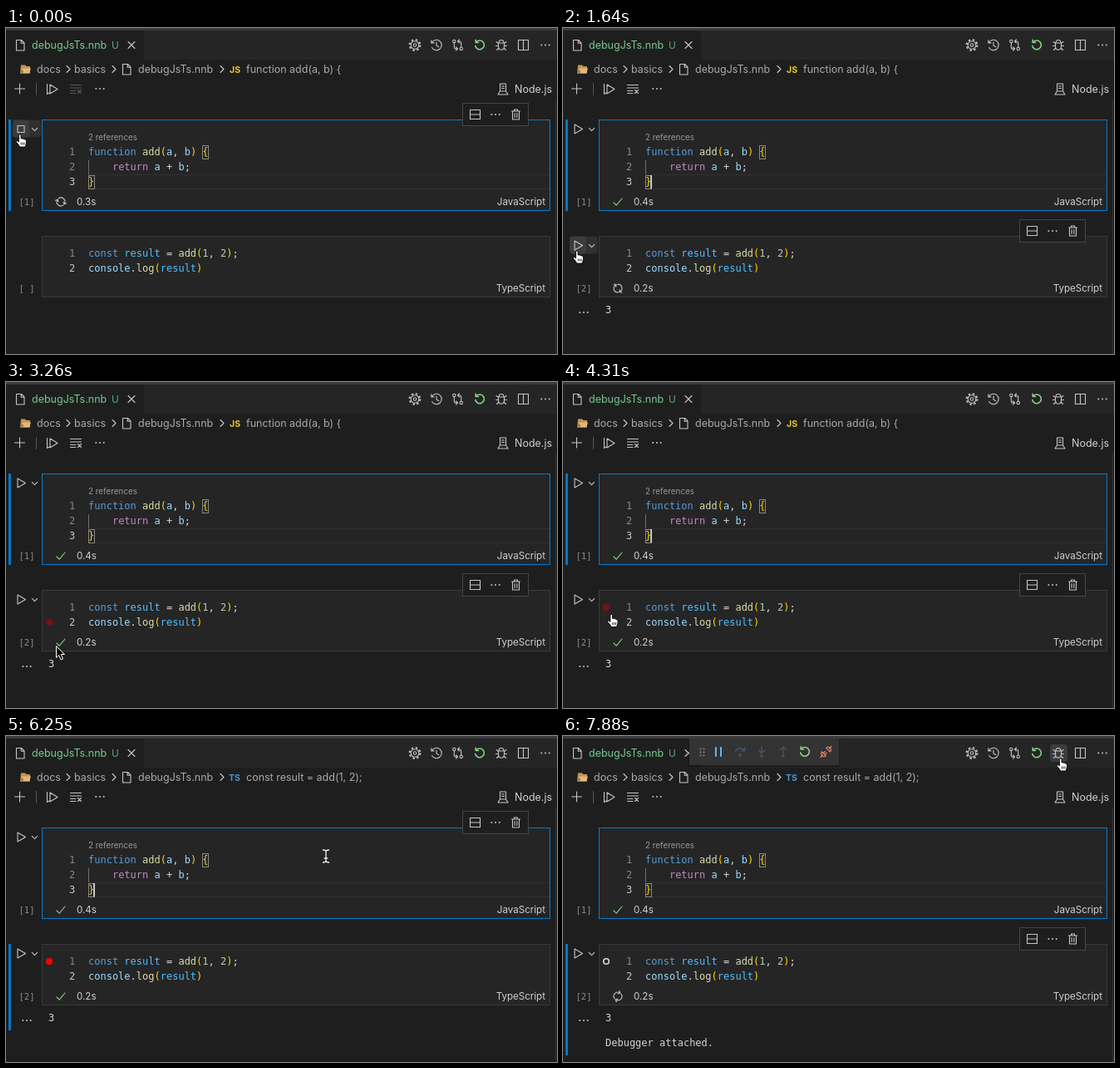
Animation, 663 px wide and 392 px high, one loop 8 s. Source, as an HTML page:

```html
<!DOCTYPE html>
<html lang="en">
<head>
<meta charset="utf-8">
<title>Notebook debugging</title>
<style>
  html, body { margin: 0; width: 100%; height: 100%; overflow: hidden; background: #1e1e1e; }
  svg { display: block; width: 663px; height: 392px; }
  text { font: 12.5px Inter, "Open Sans", sans-serif; fill: #a9a9a9; white-space: pre; }
  .mono { font: 12px "DejaVu Sans Mono", monospace; fill: #d4d4d4; }
  .small { font-size: 11.6px; fill: #d0d0d0; }
  .lens { font-size: 9.9px; fill: #999; }
  .num { fill: #858585; }
  .on { fill: #c6c6c6; }
  .count { font-size: 10.5px; fill: #8c8c8c; text-anchor: middle; }
  .lang { text-anchor: end; }
  .badge { font-size: 10.5px; font-weight: 700; }
  .i { fill: none; stroke: #c5c5c5; stroke-width: 1.1; stroke-linecap: round; stroke-linejoin: round; }
  .green { stroke: #89d185; }
  .kw { fill: #569cd6; } .fn { fill: #dcdcaa; } .id { fill: #9cdcfe; } .ct { fill: #4fc1ff; }
  .br { fill: #ffd700; } .nm { fill: #b5cea8; } .rt { fill: #c586c0; }
</style>
</head>
<body>
<svg id="stage" viewBox="0 0 663 392"></svg>
<script>
const STEP = 148.6, LOOP = 8000, LAST = 53;

const at = (x, y, body, more = '') => `<g transform="translate(${x} ${y})" ${more}>${body}</g>`;
const group = (id, body) => `<g id="${id}">${body}</g>`;
const path = (d, cls = '', more = '') => `<path class="i ${cls}" d="${d}" ${more}/>`;
const rect = (x, y, w, h, fill, more = '') =>
  `<rect x="${x}" y="${y}" width="${w}" height="${h}" fill="${fill}" ${more}/>`;
const text = (x, y, s, cls = '', more = '') => `<text x="${x}" y="${y}" class="${cls}" ${more}>${s}</text>`;
const disc = (x, y, r, fill) => `<circle cx="${x}" cy="${y}" r="${r}" fill="${fill}"/>`;
const ring = (r, cls = '', more = '') => `<circle class="i ${cls}" r="${r}" ${more}/>`;

// "kw:const| |ct:result" becomes coloured spans
const code = (x, y, src) => text(x, y, src.split('|').map(p => {
  const m = p.match(/^([a-z]{2}):(.*)$/);
  return m ? `<tspan class="${m[1]}">${m[2]}</tspan>` : p;
}).join(''), 'mono');

const dots = [-4.7, 0, 4.7].map(x => disc(x, 0, 1, '#c5c5c5')).join('');
const file = path('M-4.5 -6H1.5L5 -2.5V6.5H-4.5ZM1.2 -6V-2.2H5');
const chevron = path('M-2 -4L2 0L-2 4', '', 'stroke="#999"');
const play = path('M-4 -5.5L5.5 0L-4 5.5Z');
const stop = path('M-4 -4H4V4H-4Z');
const check = path('M-5 1L-1.8 4.2L5 -4', 'green');
const sync = path('M-4.6 1.5A4.8 4.8 0 0 1 3.6 -3.2M4.6 -1.5A4.8 4.8 0 0 1 -3.6 3.2M3.9 -5.6V-2.8H1.1M-3.9 5.6V2.8H-1.1');
const restart = path('M-4 -3.8A5.4 5.4 0 1 1 -5.3 1M-4.8 -6.2V-3H-1.5', 'green', 'style="stroke-width:1.6"');
const split = path('M-6 -5.5H6V5.5H-6ZM-6 0H6');
const trash = path('M-5 -4H5M-2 -4V-6H2V-4M-4 -4V6H4V-4M-1.4 -1.5V3.5M1.4 -1.5V3.5');
const gear = ring(4.8) + ring(1.8) + ring(6.4, '', 'style="stroke-width:2;stroke-linecap:butt" stroke-dasharray="2.4 2.63"');
const clock = path('M-5.6 -2.8A6.2 6.2 0 1 1 -5.5 3M-6.2 -5.8V-2.6H-3M0 -3.5V.6L2.8 2.2');
const compare = ring(1.7, '', 'cx="-4.2" cy="-4.5"') + ring(1.7, '', 'cx="4.2" cy="4.5"') +
  path('M-4.2 -2.6V2.5Q-4.2 4.5 -2 4.5H0M-2 2.4L0 4.5L-2 6.6M4.2 2.6V-2.5Q4.2 -4.5 2 -4.5H0M2 -6.6L0 -4.5L2 -2.4');
const bug = path('M-3 -2.5Q-3 -6 0 -6Q3 -6 3 -2.5M-3.5 -2.5H3.5V2Q3 5.8 0 5.8Q-3 5.8 -3.5 2Z' +
  'M-3.5 -1.8L-6 -4M3.5 -1.8L6 -4M-3.5 1H-6.5M3.5 1H6.5M-3 3.5L-5.5 6M3 3.5L5.5 6');
const clear = path('M-6.5 -4.5H6.5M-6.5 -1H6.5M-6.5 2.5H0M-6.5 5.5H0M2.5 1.5L6.5 5.5M6.5 1.5L2.5 5.5');

const header =
  rect(0, 0, 663, 3, '#3c3c3c') + rect(0, 3, 663, 35, '#252526') + rect(0, 3, 166, 35, '#1e1e1e') +
  at(17, 20.5, file) + text(31, 25, 'debugJsTs.nnb', '', 'style="fill:#73c991"') +
  text(127, 24.5, 'U', '', 'style="fill:#5fa577;font-size:11.8px"') +
  at(151, 20.5, path('M-4 -4L4 4M4 -4L-4 4')) +
  group('bugHover', rect(586, 10, 21, 21, '#3a3b3c', 'rx="4"')) +
  at(492, 20.5, gear) + at(518, 20.5, clock) + at(543.5, 20.5, compare) + at(570, 20.5, restart) +
  at(596, 20.5, bug) + at(622.5, 20.5, path('M-6 -6H6V6H-6ZM0 -6V6')) + at(649, 20.5, dots);

const crumbs =
  at(23, 49.5, '<path d="M-5 -5H0L1.5 -3.5H6V5H-6Z" fill="#c09553"/><path d="M-3 -1H7L5 5H-6Z" fill="#e0b877"/>' + disc(-4, 3, 2, '#a1734a')) +
  text(37, 54, 'docs') + at(75, 49.5, chevron) + text(82, 54, 'basics') + at(130, 49.5, chevron) +
  at(145, 49.5, file) + text(159, 54, 'debugJsTs.nnb') + at(260, 49.5, chevron) +
  group('crumbJs', text(269, 53.5, 'JS', 'badge', 'style="fill:#e8c52c"') + text(289, 54, 'function add(a, b) {')) +
  group('crumbTs', text(268, 53.5, 'TS', 'badge', 'style="fill:#4697d2"') + text(289, 54, 'const result = add(1, 2);'));

const tools =
  at(16.5, 73, path('M-6 0H6M0 -6V6')) + rect(36, 66, 1, 15, '#555') +
  at(55.5, 73.5, path('M-2.5 -5.5L6.5 0L-2.5 5.5ZM-6 -6V6L-2.5 4', '', 'stroke-width="1.2"')) +
  at(84, 73, group('clear', clear)) + at(113, 73, dots) +
  at(598, 73.5, path('M-3.5 -6.5H3.5V2.5H-3.5ZM-3.5 2.5L-6 6.5H6L3.5 2.5M-1.5 -3.5H1.5M-1.5 -1H1.5')) +
  text(612, 78, 'Node.js', '', 'style="fill:#d0d0d0"') + rect(661, 86, 1, 306, '#303031');

const runButton = n => group('run' + n,
  group('hover' + n, rect(8, -11, 34, 21, '#303031', 'rx="4"') + rect(8, -11, 20, 21, '#3b3c3d', 'rx="4"')) +
  at(18, 0, group('play' + n, play) + group('stop' + n, stop)) + at(34.5, .5, path('M-3.2 -1.6L0 1.6L3.2 -1.6')));
const status = n => at(66, 0, group('check' + n, check) + group('sync' + n, sync)) +
  `<text id="time${n}" x="85" y="4" class="small"></text>`;
const lineNo = (y, n, on) => text(76, y, n, 'mono ' + (on ? 'on' : 'num'));
const match = (x, y) => rect(x, y, 7, 16, 'none', 'stroke="#888"');

const cells =
  `<rect id="bar" x="3" width="3" fill="#0078c8"/>` +
  rect(43.5, 110.5, 611, 109, '#252526', 'stroke="#0a7aca"') +
  text(99, 135, '2 references', 'lens') +
  rect(99, 176, 555, 1, '#303031') + rect(99, 193, 555, 1, '#303031') +
  rect(99, 159, 1, 17, '#707070') + match(236.5, 141.5) + match(99.5, 177.5) +
  lineNo(153, 1) + lineNo(171, 2) + lineNo(189, 3, true) +
  code(99, 153, 'kw:function| |fn:add|br:(|id:a|, |id:b|br:)| |br:{') +
  code(99, 171, '    |rt:return| |id:a| + |id:b|;') + code(99, 189, 'br:}') +
  group('caret', rect(105.2, 177, 1.6, 16, '#e0e0e0')) +
  text(25, 212.5, '[1]', 'mono count') + text(649, 213, 'JavaScript', 'small lang') +
  rect(43.5, 250.5, 611, 73, '#252526', 'stroke="#3a3a3e"') +
  lineNo(275, 1) + lineNo(293, 2, true) +
  code(99, 275, 'kw:const| |ct:result| = |fn:add|br:(|nm:1|, |nm:2|br:)|;') +
  code(99, 293, 'id:console|.|fn:log|br:(|ct:result|br:)') +
  `<text id="count2" x="25" y="316.5" class="mono count"></text>` +
  text(649, 317, 'TypeScript', 'small lang') +
  at(0, 121.5, runButton(1)) + at(0, 209, status(1)) + at(0, 261.5, runButton(2)) + at(0, 313, status(2)) +
  `<circle id="dot" cx="52" r="4"/>` +
  group('output', at(25, 342, dots) + text(51, 343, '3', 'mono')) +
  group('attached', text(51, 373, 'Debugger attached.', 'mono')) +
  group('cellBar', rect(549.5, -13.5, 79, 27, '#1e1e1e', 'stroke="#454545"') +
    at(564.5, 0, split) + at(589, 0, dots) + at(613.5, 0, trash));

const grip = [-4, 0, 4].map(y => disc(-2, y, 1, '#8a8a8a') + disc(2, y, 1, '#8a8a8a')).join('');
const dim = 'style="stroke:#40566a;stroke-width:1.5"';
const debugBar = group('debugBar',
  rect(151, 4, 182, 33, '#000', 'opacity=".25"') + rect(152, 3, 180, 32, '#333334') +
  at(167.5, 19.5, grip) + at(187, 19, path('M-3 -5V5M3 -5V5', '', 'style="stroke:#75beff;stroke-width:1.8"')) +
  at(213, 19, path('M-5.5 0A5.8 5.8 0 0 1 5 -1.5M5.6 -5V-1.2H1.8', '', dim) + disc(0, 4, 1.8, '#40566a')) +
  at(239, 19, path('M0 -6V1M-3.5 -2L0 1.5L3.5 -2', '', dim) + disc(0, 5, 1.8, '#40566a')) +
  at(265, 19, path('M0 2V-6M-3.5 -2.5L0 -6L3.5 -2.5', '', dim) + disc(0, 5, 1.8, '#40566a')) +
  at(291, 19, restart) +
  at(316.5, 19, path('M-6.5 6.5L-4 4M-4.8 0L0 4.8Q-3 6.8 -5 4.5Q-6.8 2 -4.8 0ZM-3 1.5L-1 -.5M-1.3 3.2L.7 1.2' +
    'M6.5 -6.5L4 -4M4.8 0L0 -4.8Q3 -6.8 5 -4.5Q6.8 -2 4.8 0Z', '', 'style="stroke:#f48771"')));

const pointers =
  `<circle id="click" r="11" fill="none" stroke="#f00" stroke-width="2"/>` +
  group('pointer',
    group('hand', '<path d="M-1.6 1.2Q-1.6 0 -.3 0Q1 0 1 1.2V5Q2.1 4.3 3 5.2Q4.2 4.7 5 5.8Q7.5 5.6 7.5 8V10Q7.3 12 6 15H-.5Q-1 13 -4.5 9.3Q-5.2 8 -4 7.5Q-3 7.3 -1.6 9Z" fill="#fff" stroke="#000" stroke-width=".9"/>' +
      '<path d="M1.2 9.5V12.5M3.2 9.5V12.5M5.1 9.5V12.5" stroke="#000" stroke-width=".8"/>') +
    group('arrow', '<path d="M0 0V14L3.2 11L5.6 16.4L8 15.4L5.7 10H10Z" fill="#000" stroke="#fff"/>') +
    group('beam', path('M-3.5 -7.5Q0 -7.5 0 -5.5Q0 -7.5 3.5 -7.5M0 -6V6M-3.5 7.5Q0 7.5 0 5.5Q0 7.5 3.5 7.5M-1.8 2.5H1.8', '', 'style="stroke:#f2f2f2;stroke-width:1.3"')));

const stage = document.getElementById('stage');
stage.innerHTML = rect(0, 0, 663, 392, '#1e1e1e') + header + crumbs + tools + cells + debugBar + pointers;

const el = {};
stage.querySelectorAll('[id]').forEach(e => { el[e.id] = e; });
const show = (id, on) => el[id].setAttribute('visibility', on ? 'inherit' : 'hidden');
const set = (id, attrs) => { for (const k in attrs) el[id].setAttribute(k, attrs[k]); };

// step, x, y, pointer shape from there on
const route = [
  [0, 17, 128, 'hand'], [3, 17, 128, 'hand'], [4, 14, 150, 'arrow'], [5, 8, 185, 'arrow'], [6, 6, 232, 'arrow'],
  [7, 17, 268, 'hand'], [11, 17, 268, 'hand'], [12, 33, 279, 'arrow'], [13, 52, 286, 'hand'],
  [14, 130, 316, 'arrow'], [15, 270, 338, 'arrow'], [16, 398, 347, 'arrow'], [17, 57, 338, 'arrow'],
  [20, 62, 330, 'arrow'], [22, 59, 305, 'hand'], [24, 58.5, 279.5, 'hand'], [29, 58.5, 279.5, 'hand'],
  [32, 53, 277, 'hand'], [37, 53, 277, 'hand'], [38, 150, 277, 'beam'], [39, 420, 278, 'beam'],
  [40, 624, 277, 'beam'], [41, 624, 277, 'beam'], [42, 385, 144.5, 'beam'], [43, 410, 124, 'beam'],
  [44, 470, 95, 'arrow'], [46, 585, 40, 'arrow'], [47, 599, 27, 'hand'], [54, 599, 27, 'hand']
];

function pointerAt(k) {
  const i = route.findIndex(p => p[0] > k);
  const a = route[i - 1], b = route[i], f = (k - a[0]) / (b[0] - a[0]);
  return { x: a[1] + (b[1] - a[1]) * f, y: a[2] + (b[2] - a[2]) * f, shape: a[3] };
}

function draw(k) {
  const time = k * STEP, within = (a, b) => k >= a && k < b;
  const second = k >= 33, overFirst = within(42, 44);

  const p = pointerAt(k);
  set('pointer', { transform: `translate(${p.x} ${p.y})` });
  for (const s of ['hand', 'arrow', 'beam']) show(s, s === p.shape);
  const clicked = k === 7 || within(32, 34) || k === 49;
  show('click', clicked);
  if (clicked) set('click', { cx: p.x + 1.5, cy: p.y + .5 });

  show('crumbJs', !second);
  show('crumbTs', second);
  show('bugHover', k >= 47);
  set('clear', { opacity: k >= 11 ? 1 : .35 });
  show('caret', Math.floor((time - 220) / 500) % 2 === 0);

  set('bar', second ? { y: 250, height: k >= LAST ? 134 : 104 } : { y: 110, height: 110 });
  set('cellBar', { transform: `translate(0 ${k < 6 || overFirst ? 104 : 244})` });

  show('run1', !second || overFirst);
  show('hover1', k < 4);
  show('play1', k >= 2 && (!second || overFirst));
  show('stop1', k < 2);
  show('check1', k >= 2);
  show('sync1', k < 2);
  el.time1.textContent = k < 1 ? '0.3s' : '0.4s';

  const starting = within(9, 11), busy = within(9, 12) || k >= 50;
  show('run2', k >= 6);
  show('hover2', within(7, 12));
  show('play2', k >= 6 && !starting);
  show('stop2', starting);
  show('check2', k >= 12 && !busy);
  show('sync2', busy);
  el.time2.textContent = k < 9 ? '' : k < 10 ? '0.0s' : k < 11 ? '0.1s' : '0.2s';
  el.count2.textContent = k < 9 ? '[ ]' : k < 11 ? '[*]' : '[2]';
  for (const id of ['sync1', 'sync2']) set(id, { transform: `rotate(${(time * .24 + 70) % 360})` });

  show('dot', k >= 13);
  const hollow = k >= 52;
  set('dot', {
    cy: within(13, 23) ? 289 : 271, r: hollow ? 3.3 : 4,
    fill: hollow ? 'none' : second ? '#f00' : '#7d1012',
    stroke: hollow ? '#d8d8d8' : 'none', 'stroke-width': 1.6
  });
  show('output', k >= 11);
  show('attached', k >= LAST);
  show('debugBar', k >= 51);
}

const start = performance.now();
function tick() {
  const t = (performance.now() - start) % LOOP;
  draw(Math.min(LAST, Math.floor(t / STEP)));
  requestAnimationFrame(tick);
}
tick();
</script>
</body>
</html>
```
